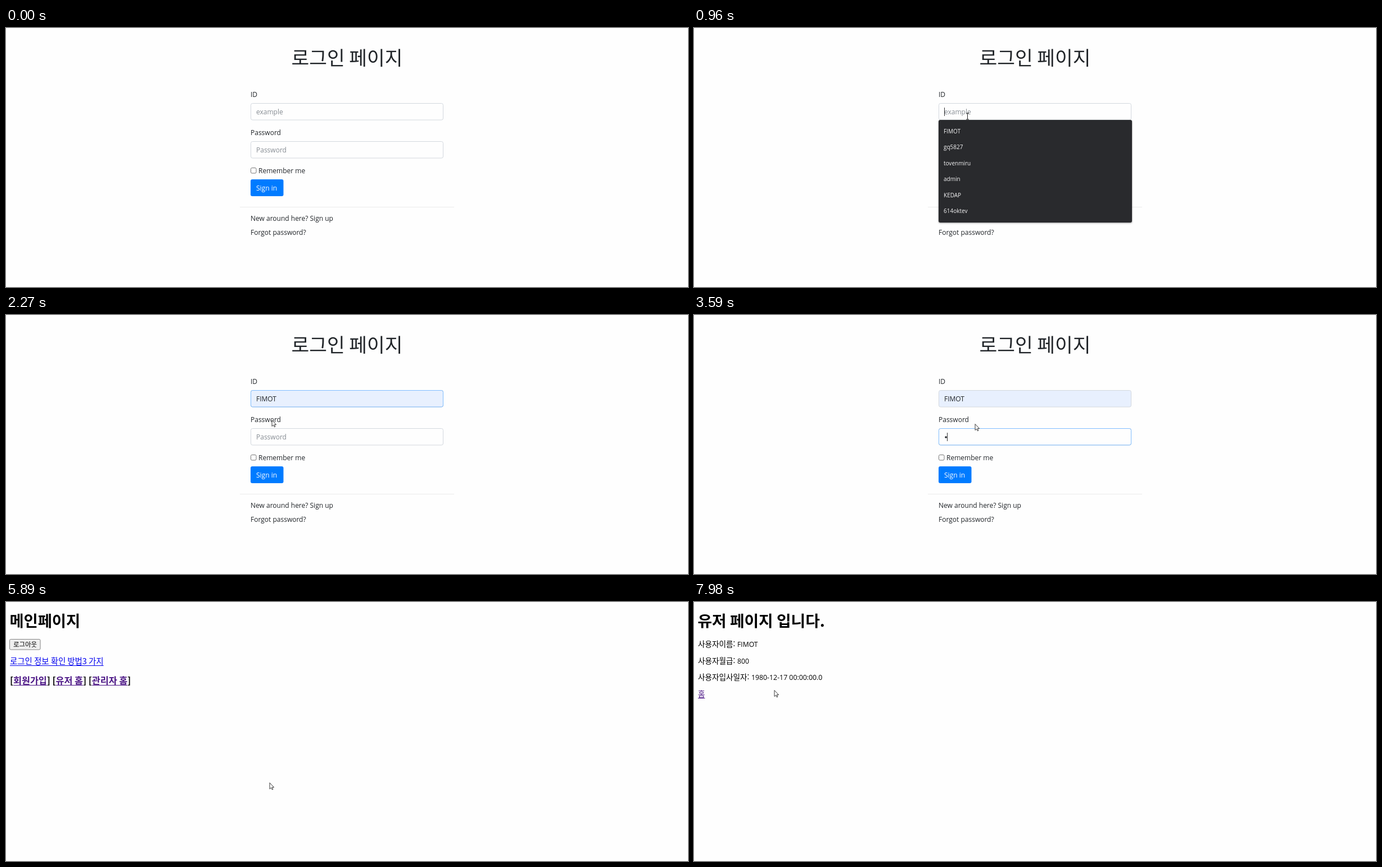
Recreate the animation shown at these times as an HTML page with a canvas. Size 1213 by 462 pixels, loop 8 s.

```html
<!DOCTYPE html>
<html lang="ko">
<head>
<meta charset="utf-8">
<title>로그인 페이지</title>
<style>
html, body { margin: 0; width: 100%; height: 100%; overflow: hidden; background: #fefefe; }
canvas { display: block; }
</style>
</head>
<body>
<canvas id="stage" width="1213" height="462"></canvas>
<script>
const ctx = document.getElementById('stage').getContext('2d');
const LOOP = 8000, TICK = 109.5;
const LATIN = '"Open Sans", "Noto Sans", sans-serif';
const HANGUL = '"Noto Sans CJK KR", "Noto Sans CJK", sans-serif';
const USER = 'FIMOT';
const SUGGESTIONS = [USER, 'gq5827', 'tovenmiru', 'admin', 'KEDAP', '614oktev'];
const INK = '#212529', BLUE = '#80bdff', VISITED = '#4b1585';

// Pointer path: tick, x, y
const PATH = [
  [0, 930, 426], [2, 720, 300], [4, 560, 195], [6, 486, 157], [11, 486, 157],
  [13, 476, 184], [14, 473, 187], [23, 473, 187], [25, 500, 194], [39, 500, 194],
  [41, 545, 290], [42, 565, 345], [43, 525, 322], [44, 481, 281], [47, 473, 287],
  [49, 473, 287], [50, 469, 322], [52, 469, 322], [54, 385, 270], [57, 190, 170],
  [59, 125, 141], [69, 125, 141], [71, 143, 157]
];

const clamp = v => Math.max(0, Math.min(1, v));

function pointerAt(n) {
  const i = PATH.findIndex(p => p[0] >= n);
  if (i < 1) return PATH[0].slice(1);
  const [t0, x0, y0] = PATH[i - 1], [t1, x1, y1] = PATH[i];
  const k = (n - t0) / (t1 - t0);
  return [x0 + (x1 - x0) * k, y0 + (y1 - y0) * k];
}

function text(str, x, y, size = 12, color = INK, family = LATIN, weight = 400) {
  ctx.font = `${weight} ${size}px ${family}`;
  ctx.fillStyle = color;
  ctx.fillText(str, x, y);
  return ctx.measureText(str).width;
}

const korean = (str, x, y, size, color = '#000', weight = 400) =>
  text(str, x, y, size, color, HANGUL, weight);

function link(str, x, y, size, color, weight) {
  const width = korean(str, x, y, size, color, weight);
  ctx.fillRect(x, y + 2, width, 1);
  return width;
}

function box(x, y, w, h, r, fill, stroke) {
  ctx.beginPath();
  ctx.roundRect(x, y, w, h, r);
  if (fill) { ctx.fillStyle = fill; ctx.fill(); }
  if (stroke) { ctx.strokeStyle = stroke; ctx.stroke(); }
}

function field(y, focus, fill) {
  box(435.5, y, 342, 29.5, 3, fill, '#d3d8de');
  ctx.globalAlpha = focus;
  box(435.5, y, 342, 29.5, 3, null, BLUE);
  ctx.globalAlpha = 1;
}

function caret(x, y) {
  ctx.fillStyle = '#333';
  ctx.fillRect(x, y, 1, 15);
}

function suggestions(hover) {
  ctx.save();
  ctx.shadowColor = 'rgba(0,0,0,.4)';
  ctx.shadowBlur = 3;
  ctx.shadowOffsetY = 1;
  box(435, 164, 344, 183, 3, '#292a2d');
  ctx.restore();
  if (hover) {
    ctx.fillStyle = '#4b4c4f';
    ctx.fillRect(435, 170, 344, 28.4);
  }
  SUGGESTIONS.forEach((name, i) => text(name, 444, 188 + i * 28.45, 10, '#f4f4f5'));
}

function loginPage(n) {
  ctx.textAlign = 'center';
  korean('로그인 페이지', 606.5, 66, 34.5, INK, 300);
  ctx.textAlign = 'left';

  text('ID', 435, 123);
  const filled = n >= 12;
  field(134.5, clamp((n - 7) / 2) * clamp((25 - n) / 2), filled ? '#e8f0fe' : '#fefefe');
  if (!filled) text('example', 445, 154, 12, '#868c93');
  else if (n < 19) text(USER, 445.5, 154, 10.6, '#000', '"Liberation Sans", Arial, sans-serif');
  else text(USER, 445, 154);
  if (n >= 7 && n < 12) caret(445, 142);

  text('Password', 435, 191);
  field(202.5, clamp((n - 23) / 2) * clamp((50 - n) / 2), '#fefefe');
  const dots = [31, 33, 37, 40].filter(t => n >= t).length;
  if (!dots) text('Password', 445, 222, 12, '#868c93');
  ctx.fillStyle = INK;
  for (let i = 0; i < dots; i++) {
    ctx.beginPath();
    ctx.arc(448 + i * 5.1, 218, 1.8, 0, 7);
    ctx.fill();
  }
  if (n >= 25 && n < 49 && (n < 27 || dots)) caret(Math.round(445 + dots * 5.1), 210);

  box(435.5, 249.5, 9.5, 9.5, 2, '#fff', '#767676');
  text('Remember me', 449, 259);

  if (n >= 49) box(433, 268, 62, 34, 5, 'rgba(0,123,255,.5)');
  box(435, 270, 58.5, 30, 3, n >= 45 ? '#0069d9' : '#007bff');
  text('Sign in', 445, 290, 12, '#fff');

  ctx.fillStyle = '#ececec';
  ctx.fillRect(416, 319, 381, 1);
  text('New around here? Sign up', 435, 344);
  text('Forgot password?', 435, 369);

  if (n >= 7 && n < 19) suggestions(filled);
}

function mainPage() {
  korean('메인페이지', 6.5, 43.5, 27.3, '#000', 700);
  box(6.5, 66.5, 54.5, 18.5, 2, '#efefef', '#858585');
  korean('로그아웃', 13, 80, 11.4);
  link('로그인 정보 확인 방법3 가지', 7, 111, 14.4, '#0000ee');
  let x = 7;
  for (const name of ['회원가입', '유저 홈', '관리자 홈']) {
    x += korean('[', x, 146, 16.2, '#000', 700);
    x += link(name, x, 146, 16.2, VISITED, 700);
    x += korean('] ', x, 146, 16.2, '#000', 700);
  }
}

function userPage() {
  korean('유저 페이지 입니다.', 6.5, 43.5, 27.8, '#000', 700);
  korean('사용자이름:', 7, 80, 13.6);
  text(USER, 77, 80, 12.2, '#000');
  korean('사용자월급:', 7, 110, 13.6);
  text('800', 77, 110, 12.2, '#000');
  korean('사용자입사일자:', 7, 139, 13.6);
  text('1980-12-17 00:00:00.0', 102, 139, 12.3, '#000');
  link('홈', 7, 169, 13.6, VISITED);
}

const ARROW = new Path2D('M0 0V11L2.6 8.7L4.3 12.3L5.9 11.6L4.3 8.1H7.6Z');
const HAND = new Path2D('M-1 1Q0-.6 1 1V5L5 6Q6.5 6.3 6.3 8L5.5 13H-1.5L-4.6 8.5Q-4.6 7-3 7.6L-1 9Z');
const IBEAM = new Path2D('M-2-5.5H3M.5-5.5V5.5M-2 5.5H3');

function pointer(n) {
  const [x, y] = pointerAt(n);
  const beam = n >= 6 && n < 12;
  const shape = beam ? IBEAM : n >= 60 && n < 70 ? HAND : ARROW;
  ctx.save();
  ctx.translate(Math.round(x), Math.round(y) + .5);
  ctx.fillStyle = '#fff';
  ctx.strokeStyle = '#222';
  ctx.lineWidth = beam ? 1 : .9;
  if (!beam) ctx.fill(shape);
  ctx.stroke(shape);
  ctx.restore();
}

function draw(now) {
  const n = Math.floor((now % LOOP - 188) / TICK);
  ctx.fillStyle = '#fefefe';
  ctx.fillRect(0, 0, 1213, 462);
  ctx.lineWidth = 1;
  if (n < 52) loginPage(n);
  else if (n < 65) mainPage();
  else userPage();
  if (n >= 0) pointer(Math.min(n, 71));
  requestAnimationFrame(draw);
}
requestAnimationFrame(draw);
</script>
</body>
</html>
```
